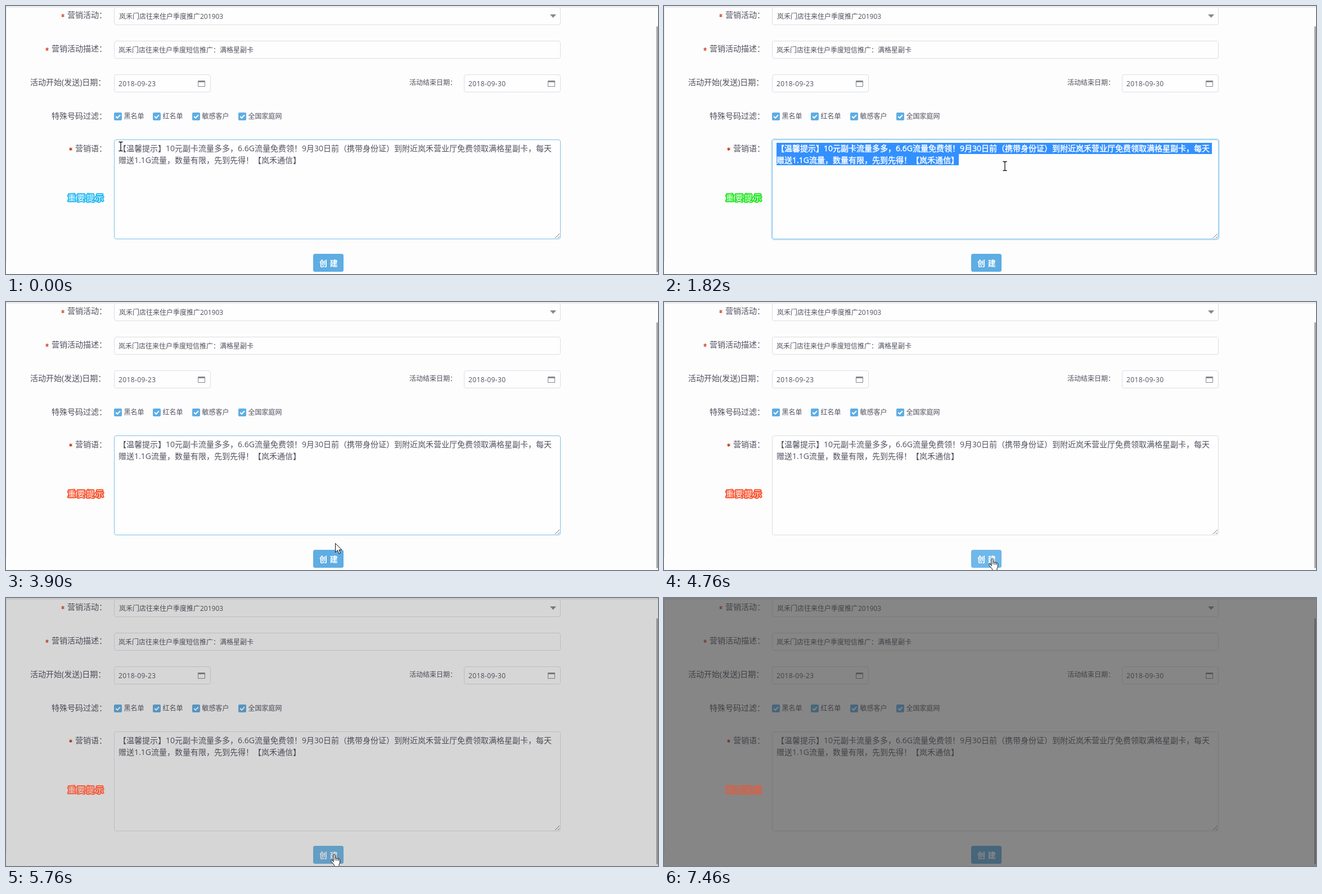
Write an HTML page that moves like this. It is 1159 px wide and 478 px high and loops after 7590 ms.

```html
<!DOCTYPE html>
<html lang="zh-CN">
<head>
<meta charset="utf-8">
<title>Form</title>
<style>
  html, body { margin: 0; width: 100%; height: 100%; overflow: hidden; background: #fdfdfd; }
  svg { display: block; width: 1159px; height: 478px; }
  text {
    font: 14px "Open Sans", "Noto Sans CJK SC", "Noto Sans CJK JP", "Noto Sans CJK", sans-serif;
    fill: #50515f; white-space: pre; text-spacing-trim: space-all;
  }
  .small { font-size: 12px; }
  .digits { letter-spacing: .4px; }
  .box { fill: #fefefe; stroke: #dcdee0; }
  .icon { fill: none; stroke: #85878f; }
  .star { stroke: #cc3a14; stroke-width: 1.2; }
  .selected text { fill: #fff; stroke: #fff; stroke-width: .45px; }
  .button { font-weight: 700; fill: #fff; word-spacing: 1px; }
  #badge {
    font-weight: 500; letter-spacing: 2.5px;
    stroke-width: 4px; stroke-linejoin: round; paint-order: stroke;
  }
</style>
</head>
<body>
<svg id="stage" viewBox="0 0 1159 478" xmlns="http://www.w3.org/2000/svg"></svg>
<script>
const LOOP = 7590;

// Markup helpers
const label = (x, y, s, cls = '') => `<text x="${x}" y="${y}" class="${cls}">${s}</text>`;
const box = (x, y, w, h, id = '') =>
  `<rect id="${id}" class="box" x="${x + .5}" y="${y + .5}" width="${w - 1}" height="${h - 1}" rx="3.5"/>`;
const star = (x, y) =>
  `<path class="star" d="M${x} ${y - 3}v6M${x - 2.6} ${y - 1.5}l5.2 3M${x - 2.6} ${y + 1.5}l5.2 -3"/>`;
const calendar = x =>
  `<path class="icon" d="M${x + .5} 133.5h12v10h-12z"/><path class="icon" stroke-width="2" d="M${x} 135h13"/>`;
const check = x =>
  `<rect x="${x}" y="190" width="14" height="14" rx="2" fill="#5eade3"/>
   <path d="M${x + 3.2} 197l2.8 2.8 5 -5.4" fill="none" stroke="#fff" stroke-width="2"/>`;

const checks = [[192, '黑名单'], [261, '红名单'], [331, '敏感客户'], [413, '全国家庭网']];
const message =
  label(200, 259, '【温馨提示】10元副卡流量多多，6.6G流量免费领！9月30日前（携带身份证）到附近岚禾营业厅免费领取满格星副卡，每天') +
  label(200, 280, '赠送1.1G流量，数量有限，先到先得！【岚禾通信】');

document.getElementById('stage').innerHTML = `
  <defs><clipPath id="selectionClip"><path id="clipShape"/></clipPath></defs>
  <rect width="1159" height="478" fill="#fdfdfd"/>
  ${box(192, 2, 794, 32)}${box(192, 62, 794, 32)}
  ${box(192, 122, 172, 32)}${box(814, 122, 172, 32)}
  <rect width="1159" height="3" fill="#ececec"/>
  <path d="M.5 3V455" stroke="#e6e6e6"/>
  <rect x="1156" y="36" width="3" height="439" rx="1.5" fill="#aaa"/>

  ${label(109, 21, '营销活动：')}${label(81, 81, '营销活动描述：')}
  ${label(43, 141, '活动开始(发送)日期：')}${label(81, 201, '特殊号码过滤：')}
  ${label(123, 259, '营销语：')}${label(717, 141, '活动结束日期：', 'small')}
  ${star(101, 17)}${star(73, 77)}${star(115, 255)}
  ${label(201, 23, '岚禾门店往来住户季度推广201903', 'small')}
  ${label(200, 83, '岚禾门店往来住户季度短信推广：满格星副卡', 'small')}
  ${label(200, 143, '2018-09-23', 'small digits')}${label(822, 143, '2018-09-30', 'small digits')}
  ${checks.map(([x, s]) => check(x) + label(x + 17.5, 201, s, 'small')).join('')}
  <path d="M967 15h11l-5.5 6z" fill="#85878f"/>
  ${calendar(341)}${calendar(963)}

  <rect id="glow" x="191" y="237" width="796" height="180" rx="5" fill="none" stroke="#cfe7f8" stroke-width="2"/>
  ${box(192, 238, 794, 178, 'area')}
  <path d="M976 414l8 -8M981 414l3 -3" stroke="#777"/>
  ${message}
  <path id="selection" fill="#3390ff"/>
  <g class="selected" clip-path="url(#selectionClip)">${message}</g>

  <rect id="button" x="546" y="442" width="54" height="32" rx="3.5"/>
  ${label(557, 464, '创 建', 'button')}

  <rect id="mask" width="1159" height="478" fill="#373737"/>
  <text id="badge" x="110" y="347">重要提示</text>

  <g id="beam" fill="none">
    <path d="M-3.5 -7.5h2.5l1 1 1 -1h2.5M0 -6.5v14M-3.5 8.5h2.5l1 -1 1 1h2.5" stroke="#111" stroke-width="1.3"/>
  </g>
  <g id="arrow">
    <path d="M.5 .5v16l3.8 -3.6 2.6 6 2.6 -1.1 -2.6 -5.8h5z" fill="#fff" stroke="#111"/>
  </g>
  <g id="hand">
    <path d="M-1.5 13V1.5q0 -1.5 1.5 -1.5t1.5 1.5v5q1.5 -1.5 3 .5 1.7 -1 2.8 .8 2.7 -.6 2.7 2v4q0 2 -1.5 4v3.5h-8.5v-2.5l-5.5 -6.5q-1 -2.3 .8 -2.6 1.5 0 3.2 3.3z"
      fill="#fff" stroke="#111"/>
    <path d="M1.5 6.5v4M4.5 7v4M7.3 8v3.5" stroke="#111"/>
  </g>`;

const el = Object.fromEntries([...document.querySelectorAll('[id]')].map(e => [e.id, e]));

// Step tables: each row starts at its first value in ms
const pointer = [
  [0, 'beam', 204, 250], [810, 'beam', 300, 254], [950, 'beam', 430, 258],
  [1100, 'beam', 530, 266], [1250, 'beam', 580, 276], [1400, 'beam', 604, 284], [1540, 'beam', 606, 285],
  [1960, 'beam', 606, 300], [2100, 'beam', 612, 350], [2240, 'arrow', 618, 425], [2380, 'arrow', 620, 446],
  [2650, 'arrow', 618, 440], [2790, 'arrow', 610, 425], [2920, 'beam', 590, 360], [3040, 'beam', 578, 300],
  [3350, 'beam', 578, 310], [3490, 'beam', 578, 345], [3630, 'beam', 580, 385], [3760, 'beam', 583, 405],
  [3900, 'arrow', 585, 430], [4060, 'hand', 584, 450], [4210, 'hand', 583.5, 457.5],
  [6340, 'arrow', 680, 400], [6480, 'arrow', 830, 300], [6630, 'arrow', 970, 205],
  [6760, 'arrow', 1013, 179], [6910, 'none', 0, 0]
];
const border = [[0, '#7cc0ea'], [2510, '#b0d4ea'], [2650, '#dcdee0'], [2920, '#a6d0ec'],
  [3040, '#7cc0ea'], [4060, '#b0d4ea'], [4210, '#dcdee0']];
const buttonFill = [[0, '#5eade3'], [4060, '#6fb8e9'], [5460, '#59a3d8'], [5760, '#6fb8e9'], [6340, '#5eade3']];
const dim = [[0, 0], [5760, .197], [5910, .535], [6060, .6]];
const blinks = [120, 390, 670, 950, 1250, 1540, 1820, 2100, 2380, 2650, 2920, 3350, 3630,
  3900, 4210, 4480, 4760, 5190, 5460, 5760, 6060, 6340, 6630, 6910, 7190, 7460];
const badgeColors = ['#22b9f2', '#1fe61f', '#f9512d'];
const drag = { start: 810, press: 670, release: 1540, clear: 2510 };

const at = (table, t) => table.findLast(row => row[0] <= t);

function selectionPath(t) {
  if (t < drag.start || t >= drag.clear) return '';
  const [, , x, y] = at(pointer, Math.min(t, drag.release));
  if (y < 265) return `M200 244H${x}V265H200z`;
  return `M200 244H974V264H${Math.min(x, 524)}V284H200z`;
}

function draw(t) {
  const [, kind, x, y] = at(pointer, t);
  for (const name of ['beam', 'arrow', 'hand']) {
    el[name].style.display = name === kind ? '' : 'none';
  }
  if (el[kind]) el[kind].setAttribute('transform', `translate(${x} ${y})`);

  const shape = selectionPath(t);
  el.selection.setAttribute('d', shape);
  el.clipShape.setAttribute('d', shape);

  el.glow.style.opacity = t >= drag.press && t < drag.clear ? 1 : 0;
  el.area.style.stroke = at(border, t)[1];
  el.button.style.fill = at(buttonFill, t)[1];

  // The badge sits above the mask; its letters take the tone of the page
  const shade = at(dim, t)[1];
  const tone = 255 - 200 * shade;
  el.mask.style.opacity = shade;
  el.badge.style.opacity = 1 - shade / 2;
  el.badge.style.fill = `rgb(${tone} ${tone} ${tone})`;
  el.badge.style.stroke = badgeColors[blinks.filter(b => b <= t).length % 3];
}

let start;
function tick(now) {
  start ??= now;
  draw((now - start) % LOOP);
  requestAnimationFrame(tick);
}
draw(0);
requestAnimationFrame(tick);
</script>
</body>
</html>
```
